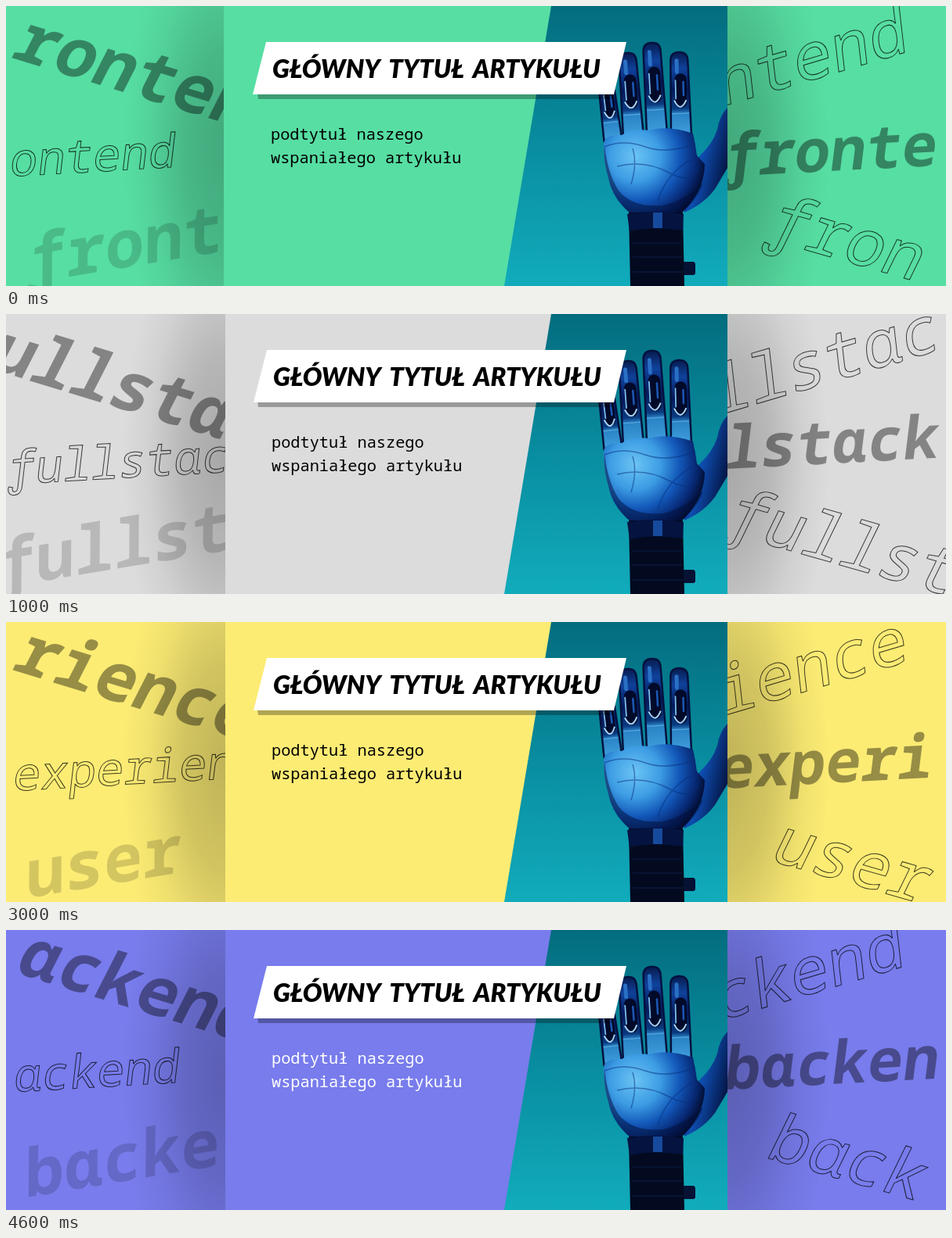
These frames come from a looping animation (1200x358 px, 5000 ms). An HTML page:

```html
<!DOCTYPE html>
<html lang="pl">
<head>
<meta charset="utf-8">
<title>Banner</title>
<style>
  html, body { margin: 0; width: 100%; height: 100%; overflow: hidden; }
  svg { display: block; width: 1200px; height: 358px; }
  .word { font-family: "Noto Sans Mono", "DejaVu Sans Mono", monospace; white-space: pre; }
  .solid { font-weight: 700; }
  .outline { font-weight: 500; fill: none; stroke: #000; stroke-width: 1; stroke-opacity: .75; }
  .title { font: italic 900 32.5px Lato, sans-serif; word-spacing: 6px; }
  .sub { font: 20.3px "Noto Sans Mono", monospace; }
</style>
</head>
<body>
<svg viewBox="0 0 1200 358">
  <defs>
    <radialGradient id="shade">
      <stop offset="0" stop-opacity=".24"/>
      <stop offset=".4" stop-opacity=".17"/>
      <stop offset=".75" stop-opacity=".05"/>
      <stop offset="1" stop-opacity="0"/>
    </radialGradient>
    <linearGradient id="teal" x2="0" y2="1">
      <stop offset="0" stop-color="#036d7f"/>
      <stop offset=".5" stop-color="#098da0"/>
      <stop offset="1" stop-color="#11acbc"/>
    </linearGradient>
    <radialGradient id="skin" gradientUnits="userSpaceOnUse" cx="803" cy="192" r="92">
      <stop offset="0" stop-color="#6cc4f4"/>
      <stop offset=".35" stop-color="#3d9de4"/>
      <stop offset=".62" stop-color="#1257b8"/>
      <stop offset=".85" stop-color="#072873"/>
      <stop offset="1" stop-color="#030d30"/>
    </radialGradient>
    <linearGradient id="thumb" x1="0" x2="1" y1=".2" y2=".7">
      <stop offset="0" stop-color="#0a2f80"/>
      <stop offset=".45" stop-color="#0e4db0"/>
      <stop offset="1" stop-color="#030f38"/>
    </linearGradient>
    <linearGradient id="finger" x2="0" y2="1">
      <stop offset="0" stop-color="#071c50"/>
      <stop offset=".2" stop-color="#0f429c"/>
      <stop offset=".45" stop-color="#06195a"/>
      <stop offset=".68" stop-color="#0a3a80"/>
      <stop offset=".74" stop-color="#2a82c4"/>
      <stop offset="1" stop-color="#3f9fdd"/>
    </linearGradient>
    <clipPath id="frame"><rect width="921" height="358"/></clipPath>
  </defs>

  <rect class="bg" width="1200" height="358"/>
  <ellipse cx="279" cy="185" rx="130" ry="330" fill="url(#shade)"/>
  <ellipse cx="921" cy="185" rx="130" ry="330" fill="url(#shade)"/>
  <g id="words"></g>

  <g clip-path="url(#frame)">
    <rect id="card" class="bg" width="643" height="358"/>
    <path d="M696 0H921V358H636Z" fill="url(#teal)"/>
    <g id="hand"></g>
  </g>

  <path d="M321 112H776L774 119H322Z" fill-opacity=".3"/>
  <path id="plate" fill="#fff"/>
  <g id="copy">
    <text class="title" x="341" y="92">GŁÓWNY TYTUŁ ARTYKUŁU</text>
    <g id="sub" class="sub">
      <text x="339" y="171">podtytuł naszego</text>
      <text x="339" y="201">wspaniałego artykułu</text>
    </g>
  </g>
</svg>
<script>
const $ = id => document.getElementById(id);

// Each spot is [text, x, y]: the foot of the first letter.
const lines = [
  { angle: 17, size: 87, fill: .4, spots: [
    ['rontend', 29, 73], ['ullstac', 0, 76], ['zawodowy', 2, 49], ['rience', 30, 68], ['ackend', 33, 61]] },
  { angle: -3.3, size: 59, spots: [
    ['ontend', 21, 217], ['fullstack', 18, 217], ['rozwój zaw', 16, 218], ['experience', 25, 215], ['ackend', 26, 206]] },
  { angle: -9.5, size: 84, fill: .16, spots: [
    ['fronte', 52, 351], ['fullsta', 13, 347], ['rozwój', 14, 341], ['user', 50, 349], ['backe', 49, 338]] },
  { angle: -16.5, size: 84, spots: [
    ['ntend', 936, 122], ['llstac', 928, 124], ['rozwój', 922, 127], ['ience', 936, 114], ['ckend', 932, 110]] },
  { angle: -3, size: 76, fill: .4, spots: [
    ['fronte', 936, 217], ['lstack', 938, 197], ['wodowy', 941, 197], ['experi', 930, 212], ['backen', 938, 203]] },
  { angle: 16, size: 84, spots: [
    ['fron', 990, 303], ['fullst', 936, 284], ['rozwój', 937, 284], ['user', 997, 311], ['back', 991, 297]] }
];
const colors = ['#57dea3', '#dcdcdc', '#fb7878', '#fcec74', '#787cec'];

// Cursive letterforms for the upright mono face.
const cursive = s => s.replace(/f/g, 'ƒ').replace(/a/g, 'ɑ');

$('words').innerHTML = lines.map(l =>
  `<text class="word ${l.fill ? 'solid' : 'outline'}" font-size="${l.size}"
    x="${-.3 * l.size}" ${l.fill ? `fill-opacity="${l.fill}"` : ''}/>`).join('');
const words = [...$('words').children];

// A finger runs from its tip (x, y) down to (bx, by).
function finger(x, y, bx, by, w) {
  const h = by - y, r = w / 2;
  const lean = Math.atan2(x - bx, h) * 180 / Math.PI;
  const bar = (dx, a, b, color, size) =>
    `<path d="M${dx * r} ${h * a}V${h * b}" stroke="${color}" stroke-width="${size}" stroke-linecap="round"/>`;
  return `<g transform="translate(${x} ${y}) rotate(${lean})" fill="none">
    <path d="M${-r} ${r}Q${-r} 0 0 0T${r} ${r}L${r + 2} ${h}H${-r - 2}Z"
      fill="url(#finger)" stroke="#04123f" stroke-width="2.5"/>
    ${bar(-.3, .1, .24, '#2a70c4', r * .45)}
    ${bar(.1, .33, .6, '#020a2a', r * 1.4)}
    ${bar(-.5, .34, .56, '#7dbdf0', 1.8)}
    ${bar(.4, .36, .52, '#1c58b4', 2.5)}
    <path d="M${-r * .7} ${h * .58}q${r * .7} 17 ${r * 1.4} 0" stroke="#a5d4f6" stroke-width="2"/>
    <path d="M${-r} ${h * .74}h${w}" stroke="#5fb0e4" stroke-width="1.5" opacity=".7"/></g>`;
}

$('hand').innerHTML = [
  finger(764, 84, 775, 172, 19),
  finger(793, 60, 801, 167, 22),
  finger(824, 47, 831, 163, 22),
  finger(859, 59, 862, 165, 22)
].join('') + `
  <path d="M921 130Q911 140 908 158Q902 176 887 190L864 222L866 264Q890 254 905 234L921 207Z" fill="url(#thumb)"/>
  <path d="M763 176Q764 164 786 165Q800 156 820 159Q846 152 877 163Q880 176 882 191
    L892 202Q892 236 862 265H797Q774 246 769 220Q762 196 763 176Z" fill="url(#skin)"/>
  <path d="M764 178Q762 196 769 220Q774 246 797 265H862Q884 246 890 226Q864 250 838 255
    Q800 258 782 236Q768 214 764 178Z" fill="#030f38" opacity=".5"/>
  <path d="M764 180Q788 170 816 180T880 176M780 205Q815 196 846 213T884 205M878 194Q842 214 832 250M800 182Q806 202 798 228"
    fill="none" stroke="#082f7c" stroke-width="1.5" opacity=".5"/>
  <path d="M795 264H864L866 358H797Z" fill="#030a20"/>
  <path d="M793 266Q828 260 865 266L864 287Q828 281 796 288Z" fill="#051340"/>
  <path d="M826 264H838V284H826Z" fill="#164a9c"/>
  <path d="M800 303H862M800 321H863M800 340H864" stroke="#071433" stroke-width="2"/>
  <path d="M865 327H877Q880 327 880 331V341Q880 344 877 344H865Z" fill="#051234"/>`;

function draw(ms) {
  const i = Math.floor(ms / 1000) % 5;
  const nudge = i ? 0 : -1;
  document.querySelectorAll('.bg').forEach(b => b.setAttribute('fill', colors[i]));
  lines.forEach((l, n) => {
    const [text, x, y] = l.spots[i];
    words[n].textContent = cursive(text);
    words[n].setAttribute('transform', `translate(${x} ${y}) rotate(${l.angle}) skewX(-10)`);
  });
  $('card').setAttribute('x', 280 + nudge * 2);
  $('plate').setAttribute('d', `M${333 + nudge} 46H792L776 113H${316 + nudge}Z`);
  $('copy').setAttribute('transform', `translate(${nudge} 0)`);
  $('sub').setAttribute('fill', i === 4 ? '#fff' : '#000');
}

const start = performance.now();
let shown = -1;
function tick() {
  const ms = performance.now() - start;
  const step = Math.floor(ms / 1000);
  if (step !== shown) draw(ms);
  shown = step;
  requestAnimationFrame(tick);
}
tick();
</script>
</body>
</html>
```
